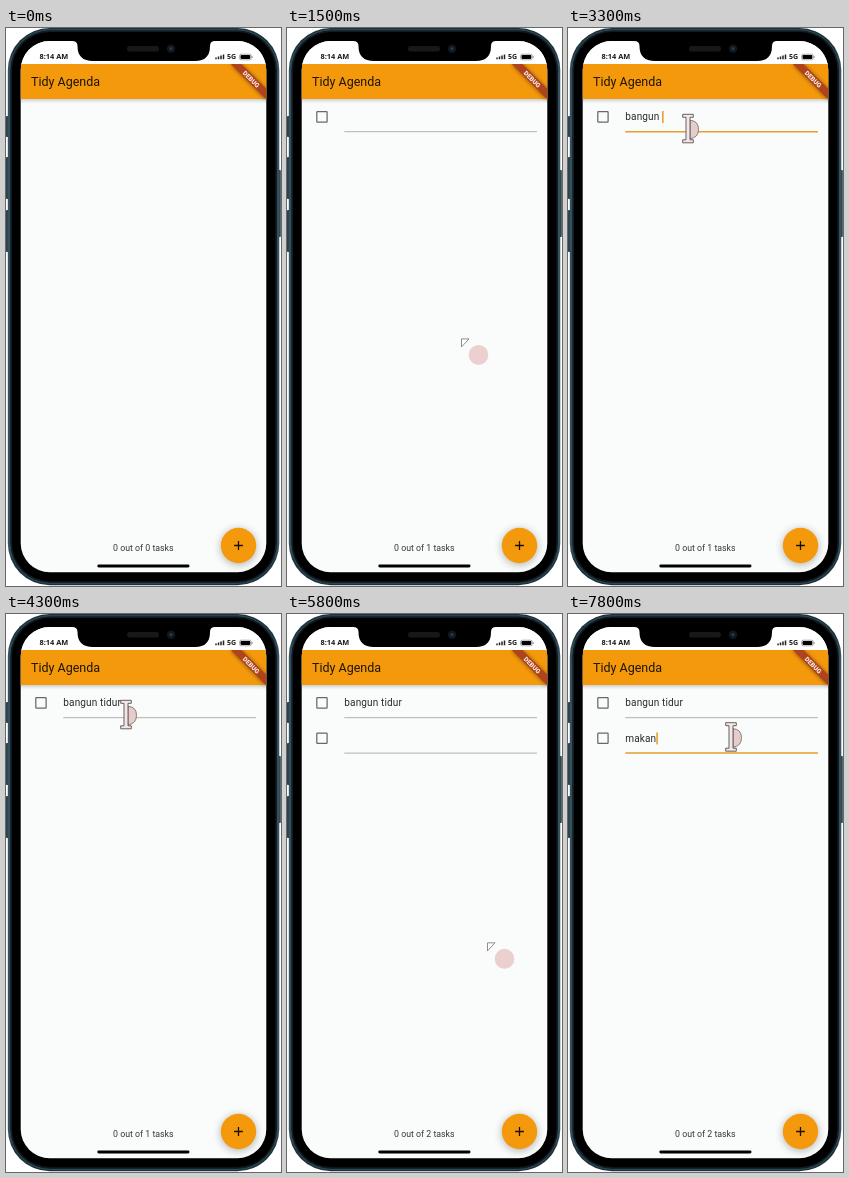
Write an HTML page that moves like this. It is 275 px wide and 558 px high and loops after 8 s.

```html
<!DOCTYPE html>
<html lang="en">
<head>
<meta charset="utf-8">
<title>Task list</title>
<style>
  html, body { margin: 0; width: 100%; height: 100%; overflow: hidden; background: #fff; }
  svg { display: block; width: 100vw; height: 100vh; }
  text { font-family: Roboto, "Noto Sans", sans-serif; white-space: pre; }
  .status { font: 700 7.4px "Open Sans", sans-serif; fill: #1a1a1a; }
  .title { font-size: 12.5px; fill: #1f1503; }
  .debug { font-size: 6.4px; font-weight: 800; fill: #fbeee6; text-anchor: middle; }
  .count { font-size: 8.79px; fill: #383838; text-anchor: middle; }
  .task { font-size: 10.05px; letter-spacing: .12px; fill: #2c2c2c; }
</style>
</head>
<body>
<svg viewBox="0 0 275 558" preserveAspectRatio="none">
  <defs>
    <clipPath id="screen"><rect x="14.7" y="13" width="245.6" height="531.2" rx="29"/></clipPath>
    <filter id="soft" x="-50%" y="-50%" width="200%" height="200%"><feGaussianBlur stdDeviation="2.2"/></filter>
    <filter id="wide" x="-80%" y="-80%" width="260%" height="260%"><feGaussianBlur stdDeviation="4.5"/></filter>
    <linearGradient id="rim" x2="1">
      <stop offset="0" stop-color="#3b5765"/><stop offset=".02" stop-color="#1b323c"/>
      <stop offset=".98" stop-color="#1b323c"/><stop offset="1" stop-color="#3b5765"/>
    </linearGradient>
  </defs>

  <!-- phone body -->
  <g fill="#2a424c">
    <rect x="0" y="88" width="3" height="21" rx=".8"/>
    <rect x="0" y="129" width="3" height="42" rx=".8"/>
    <rect x="0" y="182" width="3" height="42" rx=".8"/>
    <rect x="271.6" y="142" width="3.2" height="67" rx=".8"/>
  </g>
  <rect x="1.8" y="0" width="271.5" height="557.2" rx="42" fill="url(#rim)"/>
  <rect x="3.8" y="1.8" width="267.7" height="553.6" rx="40.5" fill="#101c22" stroke="#405c69" stroke-width=".7"/>
  <rect x="6" y="4" width="263.3" height="549.2" rx="38" fill="#000"/>

  <g clip-path="url(#screen)">
    <rect x="14" y="13" width="247" height="532" fill="#fafbfb"/>
    <rect x="13" y="36" width="250" height="36" fill="#000" opacity=".26" filter="url(#soft)"/>
    <rect x="14" y="13" width="247" height="23" fill="#fff"/>
    <rect x="14" y="36" width="247" height="35" fill="#f5990c"/>
    <text class="title" x="25" y="58.4">Tidy Agenda</text>

    <!-- corner ribbon -->
    <svg x="15" y="36" width="246" height="60" viewBox="15 36 246 60">
      <path d="M224.5 36H235.1L260.5 61.4V72Z" fill="#000" opacity=".5" filter="url(#soft)"/>
      <path d="M224.8 36H235.4L260.5 61.1V71.7Z" fill="#b0431d"/>
      <text class="debug" transform="translate(245.2 51.2) rotate(45)" y="2.3">DEBUG</text>
    </svg>

    <g id="rows"></g>
    <text id="count" class="count" x="137.3" y="523"></text>
    <rect x="91.3" y="536.6" width="92.2" height="2.9" rx="1.45" fill="#000"/>

    <circle id="shade" cx="232.5" cy="519" fill="#000" filter="url(#wide)"/>
    <circle cx="232.5" cy="517.5" r="17.7" fill="#f5990c"/>
    <circle id="press" cx="232.5" cy="517.5" r="17.7" fill="#9aa084"/>
    <path d="M228.1 517.5H236.9M232.5 513.1V521.9" stroke="#1a1000" stroke-width="1.3"/>
  </g>

  <!-- notch and status bar -->
  <path d="M66 12H209V13Q204 13 204 18Q204 33 189 33H87Q71.5 33 71.5 18Q71.5 13 66 13Z" fill="#000"/>
  <rect x="121" y="18" width="32" height="5.6" rx="2.8" fill="#18181b"/>
  <circle cx="165" cy="20.8" r="4.2" fill="#10171d"/>
  <circle cx="165" cy="20.8" r="1.7" fill="#26384a"/>
  <text class="status" x="33.5" y="30.8">8:14 AM</text>
  <text class="status" x="221" y="31.4" style="font-size:7px">5G</text>
  <path d="M210 31.2V29.4M212.5 31.2V28.6M215 31.2V27.6M217.5 31.2V26.4" stroke="#222" stroke-width="1.5"/>
  <rect x="233.6" y="26.2" width="11.6" height="5.6" rx="1.5" fill="#fff" stroke="#777" stroke-width=".6"/>
  <rect x="234.5" y="27.1" width="9.8" height="3.8" rx=".8" fill="#000"/>
  <path d="M246.2 28.2V30" stroke="#777" stroke-width=".8"/>

  <g id="arrow">
    <ellipse cx="17.5" cy="16.5" rx="9.8" ry="10" fill="#ebd0cf"/>
    <path d="M.5 .5H8L.5 8.5Z" fill="#fff" stroke="#77706c" stroke-width=".8"/>
  </g>
  <g id="beam">
    <path d="M2 -8.5Q10.5 -8 10.5 .5T2 10Z" fill="#e4cdca" stroke="#75656a" stroke-width=".8"/>
    <path d="M-5.3 -14.5H5.3V-11.5H2V11H5.3V14H-5.3V11H-2V-11.5H-5.3Z" fill="#f1e9e8" stroke="#5c4e50" stroke-width=".9"/>
  </g>
</svg>
<script>
const LOOP = 8000, STEP = 100, ROW = 35.4;
const $ = id => document.getElementById(id);

const tasks = [
  { text: "bangun tidur", born: 1100, focus: 2200, blur: 4200,
    keys: [2500, 2800, 2900, 3000, 3100, 3200, 3300, 3500, 3600, 3700, 3800, 4000] },
  { text: "makan", born: 5400, focus: 6200, blur: LOOP,
    keys: [6900, 7100, 7200, 7300, 7600] }
];
const clicks = [1100, 5200];

// Pointer moves: start, end, from, to
const moves = [
  [300, 900, [266, 580], [228, 520]],
  [1200, 1800, [228, 520], [120, 100.8]],
  [4300, 5200, [120, 100.8], [237, 533.5]],
  [5500, 6100, [237, 533.5], [163, 123.2]]
];

function node(tag, attrs, parent) {
  const el = document.createElementNS("http://www.w3.org/2000/svg", tag);
  for (const k in attrs) el.setAttribute(k, attrs[k]);
  return parent.appendChild(el);
}

tasks.forEach((task, i) => {
  const g = node("g", { transform: `translate(0 ${i * ROW})` }, $("rows"));
  node("rect", { x: 29.8, y: 83.7, width: 10.3, height: 10.3, rx: .6, fill: "none", stroke: "#686868", "stroke-width": 1.25 }, g);
  task.line = node("path", { d: "M57.3 103.7H250" }, g);
  task.label = node("text", { x: 57.3, y: 92.4, class: "task" }, g);
  task.caret = node("rect", { y: 83, width: 1.6, height: 12, fill: "#e8a02c" }, g);
  task.g = g;
});

const show = (el, on) => el.setAttribute("visibility", on ? "visible" : "hidden");
const ease = p => p * p * (3 - 2 * p);

function pointer(t) {
  const move = moves.filter(m => t >= m[0]).pop();
  if (!move) return null;
  const [start, end, from, to] = move;
  const p = ease(Math.min(1, (t - start) / (end - start)));
  return from.map((v, k) => v + (to[k] - v) * p);
}

function drawTask(task, t) {
  const typed = task.keys.filter(k => k <= t);
  const focused = t >= task.focus && t < task.blur;
  const last = Math.max(task.focus, ...typed);
  const alive = t >= task.born;
  show(task.g, alive);
  task.label.textContent = task.text.slice(0, typed.length);
  task.line.setAttribute("stroke", focused ? "#e5a02e" : "#b0b0b0");
  task.line.setAttribute("stroke-width", focused ? 1.5 : 1);
  task.caret.setAttribute("x", 57.3 + (typed.length ? task.label.getComputedTextLength() : 0));
  show(task.caret, alive && focused && (t - last) % 1000 < 500);
}

function draw(time) {
  const t = Math.floor(time % LOOP / STEP) * STEP;
  tasks.forEach(task => drawTask(task, t));
  const total = tasks.filter(task => t >= task.born).length;
  $("count").textContent = `0 out of ${total} tasks`;

  const press = Math.max(...clicks.map(c => Math.max(0, 1 - Math.abs(t - c) / 200)));
  $("press").setAttribute("opacity", press * .22);
  $("shade").setAttribute("opacity", .3 + press * .06);
  $("shade").setAttribute("r", 17.6 + press * 3);

  const pos = pointer(t);
  const overField = !!pos && pos[0] > 57 && pos[0] < 250 &&
    tasks.some((task, i) => t >= task.born && Math.abs(pos[1] - 89 - i * ROW) < 15);
  show($("arrow"), pos && !overField);
  show($("beam"), overField);
  if (pos) for (const id of ["arrow", "beam"]) $(id).setAttribute("transform", `translate(${pos})`);
}

const begin = performance.now();
function tick() {
  draw(performance.now() - begin);
  requestAnimationFrame(tick);
}
tick();
</script>
</body>
</html>
```
